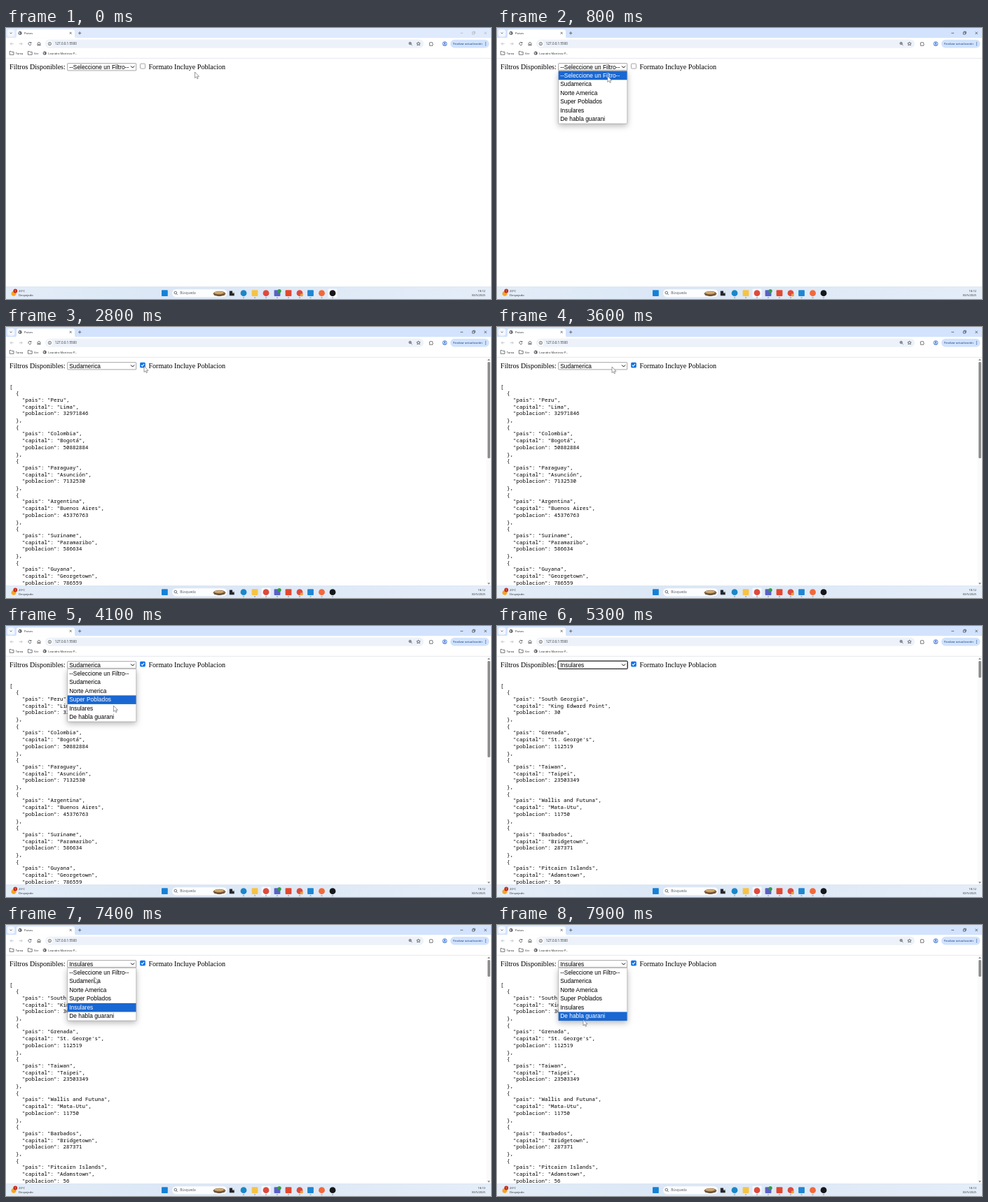
These frames come from a looping animation (692 px wide and 388 px high, 8000 ms). An HTML page:

```html
<!DOCTYPE html>
<html lang="es">
<head>
<meta charset="utf-8">
<title>Paises</title>
<style>
  html, body { margin: 0; width: 100%; height: 100%; overflow: hidden; background: #fff; }
  #stage { position: absolute; left: 0; top: 0; width: 692px; height: 388px; overflow: hidden; }
  svg { position: absolute; left: 0; top: 0; width: 692px; height: 388px; }
  svg text { font-family: "Open Sans", "Noto Sans", sans-serif; font-size: 4.2px; fill: #2b2d30; }
  svg .serif { font: 10.09px "Liberation Serif", serif; fill: #000; }
  svg .ctl { font: 8.41px "Liberation Sans", sans-serif; fill: #000; }
  svg .on { fill: #fff; }
  .ln { fill: none; stroke: #474a4f; stroke-width: .75; }
  .dim { stroke: #b4b7bb; }
  #page { position: absolute; left: 0; top: 44px; width: 685px; height: 326.5px; overflow: hidden; }
  #json { position: absolute; left: 5.05px; top: 36.5px; margin: 0; color: #000;
          font: 7.513px/9.71px "Noto Sans Mono", "DejaVu Sans Mono", monospace; }
  #list rect.box { filter: drop-shadow(0 3px 4px rgba(0,0,0,.28)); }
</style>
</head>
<body>
<div id="stage">
  <div id="page"><pre id="json"></pre></div>
  <svg viewBox="0 0 692 388">
    <defs>
      <g id="globe"><circle r="2.5" fill="#4d5156"/><path d="M-1.6-1.2l1.6.5.5 1.2-1.3 1zM.8-1.7l1 1.2" fill="#e8eaed" stroke="#e8eaed" stroke-width=".4"/></g>
      <path id="folder" class="ln" d="M0 .4h2l.8.9h3v3.9h-5.8z"/>
      <linearGradient id="bar"><stop offset="0" stop-color="#e3edf8"/><stop offset=".35" stop-color="#dbe7f6"/><stop offset="1" stop-color="#e4edf8"/></linearGradient>
    </defs>

    <!-- tab strip -->
    <rect id="strip" width="692" height="14.5"/>
    <rect x="1.8" y="2" width="10.6" height="10.6" rx="3.5" fill="#f3f7fe"/>
    <path class="ln" d="M5.7 6.6l1.4 1.4 1.4-1.4"/>
    <path d="M12 14.5q3 0 3-3v-6q0-3.2 3.2-3.2h76.6q3.2 0 3.2 3.2v6q0 3 3 3z" fill="#fff"/>
    <use href="#globe" x="20" y="7.3"/>
    <text x="26" y="8.9">Paises</text>
    <path class="ln" d="M90.7 5.8l3 3m0-3l-3 3M103 7.3h4.4m-2.2-2.2v4.4"/>
    <path id="winctl" class="ln" d="M648.3 7.3h3.8M665.3 6h3v3h-3zM666.3 6v-.9h2.9v2.9h-.9M682.4 5.6l3.4 3.4m0-3.4l-3.4 3.4"/>

    <!-- toolbar -->
    <rect y="14.3" width="692" height="29.2" fill="#fff"/>
    <path class="ln dim" d="M10.6 22.6h-4.4m2-2l-2 2 2 2M18.8 22.6h4.4m-2-2l2 2-2 2"/>
    <path class="ln" d="M35.6 21.2a2.1 2.1 0 1 0 .4 1.8M36 20v1.6h-1.7M45 25v-3l2-1.9 2 1.9v3h-1.3v-1.7h-1.4v1.7z"/>
    <rect x="56" y="16.4" width="540" height="12.4" rx="6.2" fill="#edf2fa"/>
    <circle cx="62.4" cy="22.6" r="4.3" fill="#fff"/>
    <circle class="ln" cx="62.4" cy="22.6" r="2.2"/>
    <path class="ln" d="M62.4 22.2v1.6m0-2.7v.6"/>
    <text x="69.8" y="24.3" style="font-size:4.6px">127.0.0.1:5500</text>
    <circle class="ln" cx="576.6" cy="22" r="1.7"/>
    <path class="ln" d="M577.9 23.3l1.6 1.6M575.8 22h1.6m-.8-.8v1.6"/>
    <path class="ln" d="M588.5 19.9l.8 1.7 1.8.2-1.4 1.2.5 1.9-1.7-1-1.7 1 .5-1.9-1.4-1.2 1.8-.2z"/>
    <path class="ln" d="M604.3 21h1.3q.8-2 1.6 0h1.5v1.4q1.5.7 0 1.5v1.3h-4.4z"/>
    <circle cx="626" cy="22.6" r="3" fill="#d6e6ff" stroke="#2a62c9" stroke-width=".7"/>
    <circle cx="626" cy="21.8" r="1" fill="#2a62c9"/>
    <path d="M624.2 24.5q1.8-1.7 3.6 0" fill="none" stroke="#2a62c9" stroke-width=".8"/>
    <rect x="634" y="16.8" width="55.5" height="11.6" rx="5.8" fill="#d0e2fd"/>
    <text x="637.8" y="24.1" style="font-size:4.13px;fill:#0c3477">Finalizar actualización</text>
    <g fill="#0c3477"><circle cx="684.3" cy="20.6" r=".55"/><circle cx="684.3" cy="22.6" r=".55"/><circle cx="684.3" cy="24.6" r=".55"/></g>

    <!-- bookmarks -->
    <use href="#folder" x="5.2" y="33"/><text x="13.8" y="37.6">Tarea</text>
    <use href="#folder" x="31.4" y="33"/><text x="40" y="37.6">Ver</text>
    <use href="#globe" x="55.2" y="36"/><text x="60.3" y="37.6">Leandro Martinez P...</text>
    <path d="M0 43.4h692" stroke="#dfe3e9" stroke-width=".8"/>

    <!-- form -->
    <text class="serif" x="5.05" y="58.7">Filtros Disponibles:</text>
    <rect id="ring" x="87.2" y="50.2" width="99" height="11.2" rx="1.6" fill="none" stroke="#101010" stroke-width="1.4"/>
    <rect x="87.7" y="50.7" width="98" height="10.2" rx=".6" fill="#fff" stroke="#767676" stroke-width=".65"/>
    <text class="ctl" id="value" x="90.2" y="58.8"></text>
    <path d="M178.1 54.4l2.5 2.6 2.5-2.6" fill="none" stroke="#111" stroke-width="1"/>
    <rect id="check" x="191.5" y="51.1" width="7" height="7" rx="1.1" stroke-width=".65"/>
    <path id="tick" d="M192.9 54.7l1.5 1.5 2.7-3.3" fill="none" stroke="#fff" stroke-width="1.1"/>
    <text class="serif" x="203.4" y="58.7">Formato Incluye Poblacion</text>

    <g id="scroll">
      <rect x="685.4" y="43.8" width="6.6" height="327" fill="#fafafa"/>
      <path d="M687 48l1.9-2.4 1.9 2.4zM687 366.3l1.9 2.4 1.9-2.4z" fill="#858585"/>
      <rect id="thumb" x="687.2" y="50" width="3.6" rx="1.5" fill="#8b8b8b"/>
    </g>

    <g id="list">
      <rect class="box" x="87.6" y="61.4" width="98.2" height="75.6" rx=".8" fill="#fff" stroke="#8a8a8a" stroke-width=".5"/>
      <rect id="mark" x="87.8" width="97.8" height="12.55" fill="#1967d2"/>
      <g id="items"></g>
    </g>

    <!-- taskbar -->
    <rect y="370.5" width="692" height="17.5" fill="url(#bar)"/>
    <path d="M0 370.7h692" stroke="#cfdae8" stroke-width=".5"/>
    <circle cx="11" cy="380.3" r="3.4" fill="#f5a524"/>
    <circle cx="13.3" cy="376.5" r="2.9" fill="#c42b1c"/>
    <text x="12.3" y="377.8" style="font-size:3.6px;fill:#fff">1</text>
    <text x="18" y="378.1">20°C</text>
    <text x="18" y="383.7">Despejado</text>
    <rect x="222" y="375.3" width="8.8" height="8.8" rx=".8" fill="#1481d8"/>
    <rect x="236.6" y="373.7" width="79.2" height="12" rx="6" fill="#fbfdff" stroke="#d3dce8" stroke-width=".5"/>
    <circle class="ln" cx="241.8" cy="379" r="1.8"/><path class="ln" d="M243.1 380.4l1.7 1.7"/>
    <text x="248.2" y="381.3" style="font-size:4.8px;fill:#55585d">Búsqueda</text>
    <ellipse cx="304.5" cy="380.3" rx="8.8" ry="3.6" fill="#8a653f"/>
    <ellipse cx="304" cy="379" rx="6.6" ry="1.8" fill="#d3ad73"/>
    <path d="M297 382.2q7 2.4 15-.2" fill="none" stroke="#3f3a30" stroke-width="1"/>
    <rect x="320.5" y="378.4" width="5.6" height="5" fill="#b9bec5"/>
    <path d="M318.8 376.4h4.2v3.3h2.6v3.5h-6.8z" fill="#24272b"/>
    <rect id="active" y="373.5" width="13" height="12.6" rx="1.6" fill="#f6faff"/>
    <g id="apps"></g>
    <g text-anchor="end"><text id="clock" x="684" y="378.1"></text><text x="684" y="383.7">30/5/2025</text></g>

    <path id="cursor" d="M0 0v8.6l2-1.8 1.3 2.9 1.4-.6-1.3-2.8h2.6z" fill="#fff" stroke="#55585c" stroke-width=".6"/>
  </svg>
</div>
<script>
const LOOP = 8000, STEP = 100, ROW = 12.55, TOP = 61.7;
const $ = id => document.getElementById(id);
const options = ['--Seleccione un Filtro--', 'Sudamerica', 'Norte America', 'Super Poblados', 'Insulares', 'De habla guarani'];

const south = [['Peru', 'Lima', 32971846], ['Colombia', 'Bogotá', 50882884], ['Paraguay', 'Asunción', 7132530],
  ['Argentina', 'Buenos Aires', 45376763], ['Suriname', 'Paramaribo', 586634], ['Guyana', 'Georgetown', 786559],
  ['Chile', 'Santiago', 19116209], ['Bolivia', 'Sucre', 11673029]];
const islands = [['South Georgia', 'King Edward Point', 30], ['Grenada', "St. George's", 112519], ['Taiwan', 'Taipei', 23503349],
  ['Wallis and Futuna', 'Mata-Utu', 11750], ['Barbados', 'Bridgetown', 287371], ['Pitcairn Islands', 'Adamstown', 56]];

const format = (rows, full) => JSON.stringify(rows.map(([pais, capital, poblacion]) =>
  full ? { pais, capital, poblacion } : { pais, capital }), null, 2);

// views: start time, page text, scroll thumb height
const views = [[0, '', 0], [1700, format(south, false), 168], [2800, format(south, true), 138], [4800, format(islands, true), 24]];

// pointer path: time, x, y
const path = [[0, 269.5, 63], [300, 163, 53], [500, 163, 53], [900, 156, 74], [1300, 152, 79], [1700, 152, 79],
  [2200, 196.5, 56], [2400, 196.5, 56], [2500, 197, 56], [2900, 197, 56], [3500, 164, 57], [3800, 164, 57],
  [4000, 154.5, 107], [4100, 153.5, 114], [4400, 151, 119], [5900, 150, 118], [6200, 130, 80], [6500, 130, 80],
  [6700, 127.5, 74.5], [6900, 127, 57], [7300, 127, 57], [7700, 124, 128], [7900, 123, 135.5]];

const apps = [[339, '#1b86c8', 1], [355, '#f6c344', 0], [371, '#de4a3c', 1], [387, '#5b5fc7', 0], [403, '#e2472f', 0],
  [419, '#de4a3c', 1], [434.5, '#1f86d2', 0], [450.5, '#f2683a', 1], [466, '#15171a', 1]];

const within = (t, ...spans) => spans.some(([a, b]) => t >= a && t < b);
const show = (id, on) => $(id).setAttribute('visibility', on ? 'visible' : 'hidden');
const set = (id, attrs) => { for (const k in attrs) $(id).setAttribute(k, attrs[k]); };

function pointer(t) {
  const i = path.findIndex(p => p[0] > t);
  if (i < 0) return path[path.length - 1].slice(1);
  if (i === 0) return path[0].slice(1);
  const [t0, x0, y0] = path[i - 1], [t1, x1, y1] = path[i], k = (t - t0) / (t1 - t0);
  return [x0 + (x1 - x0) * k, y0 + (y1 - y0) * k];
}

$('items').innerHTML = options.map((s, i) =>
  `<text class="ctl" x="90.2" y="${TOP + ROW * i + 9}">${s}</text>`).join('');
$('apps').innerHTML = apps.map(([x, c, round]) =>
  `<rect x="${x - 4.4}" y="375.3" width="8.8" height="8.8" rx="${round ? 4.4 : 1}" fill="${c}"/>` +
  `<rect x="${x - 1.2}" y="385.6" width="2.4" height=".9" rx=".4" fill="#858c95"/>`).join('') +
  '<circle cx="390" cy="376.6" r="2.7" fill="#2f9e3f"/><circle cx="421.8" cy="382.3" r="2.1" fill="#e3a23c"/>';

let last = -1;
function draw(t) {
  const [x, y] = pointer(t);
  const focused = t >= 500, checked = t >= 2800;
  const open = within(t, [500, 1600], [3800, 4700], [6900, LOOP]);
  const chosen = t < 1700 ? 0 : t < 4800 ? 1 : 4;
  const view = views.filter(v => v[0] <= t).pop();

  set('strip', { fill: focused ? '#d3e3fd' : '#dfeafd' });
  set('winctl', { class: focused ? 'ln' : 'ln dim' });
  set('active', { x: focused ? 364.5 : 459.5 });
  $('value').textContent = options[chosen];
  show('ring', within(t, [1700, 2800], [4800, 6900]));
  set('check', { fill: checked ? '#0b72e7' : '#fff', stroke: checked ? '#0b72e7' : '#767676' });
  show('tick', checked);
  if ($('json').textContent !== view[1]) $('json').textContent = view[1];
  show('scroll', view[2] > 0);
  set('thumb', { height: view[2] });
  $('clock').textContent = t < 5800 ? '18:12' : '18:13';

  // the highlight trails the pointer by one step
  const row = Math.floor((pointer(Math.max(0, t - STEP))[1] - TOP) / ROW);
  const lit = row < 0 ? chosen : Math.min(row, options.length - 1);
  $('list').style.display = open ? '' : 'none';
  set('mark', { y: TOP + ROW * lit });
  [...$('items').children].forEach((el, i) => el.classList.toggle('on', i === lit));

  show('cursor', !within(t, [4800, 5900]));
  set('cursor', { transform: `translate(${x} ${y})` });
}

const start = performance.now();
function tick() {
  const t = Math.floor(((performance.now() - start) % LOOP) / STEP) * STEP;
  if (t !== last) draw(last = t);
  requestAnimationFrame(tick);
}
tick();
</script>
</body>
</html>
```
